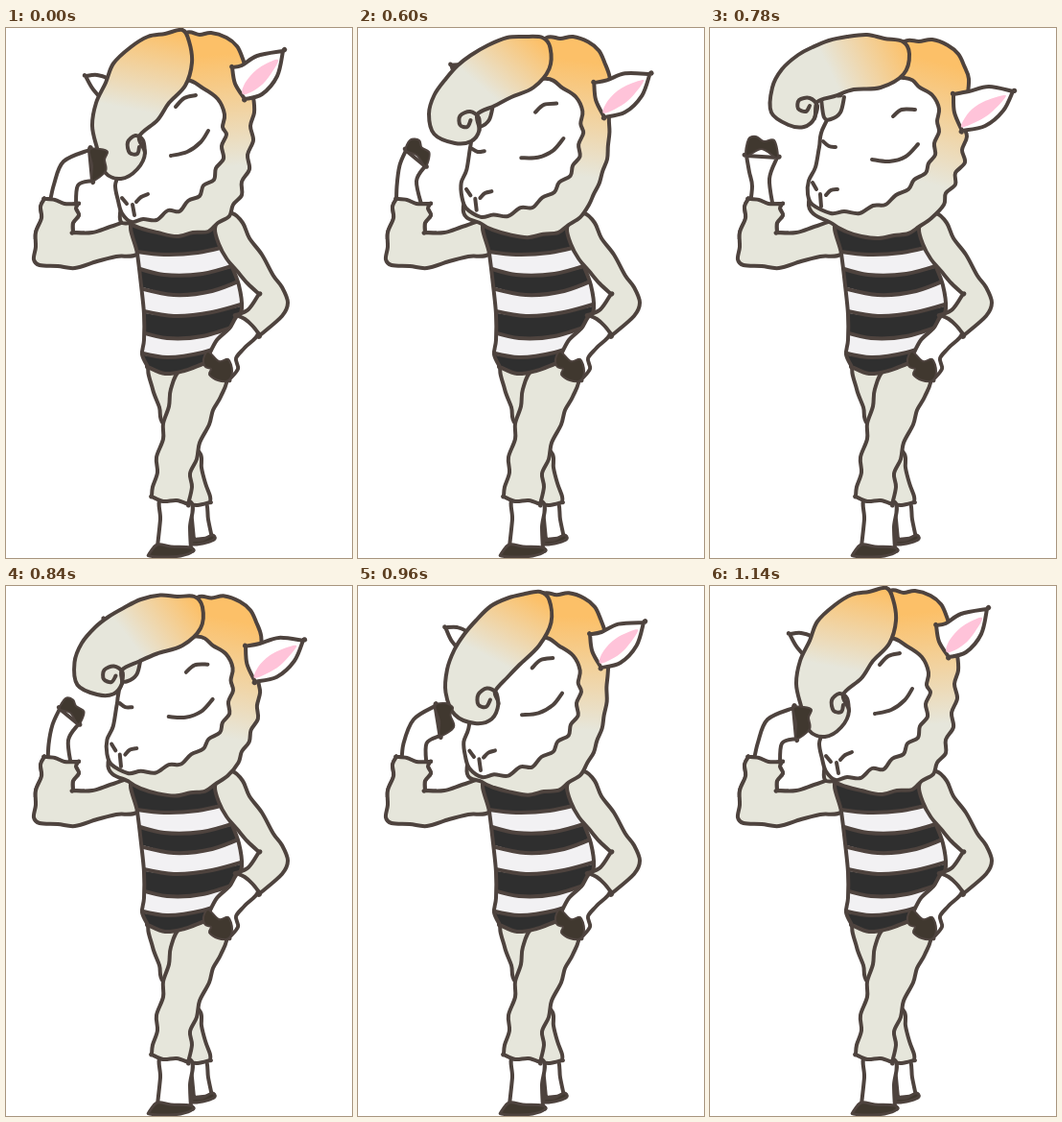
Animation of 361x552 px, one loop 1380 ms. Source, as an HTML page with a canvas:

```html
<!DOCTYPE html>
<html lang="en">
<head>
<meta charset="utf-8">
<title>Sheep hair flick</title>
<style>
html, body { margin: 0; width: 100%; height: 100%; overflow: hidden; background: #fff; }
canvas { display: block; width: 361px; height: 552px; }
</style>
</head>
<body>
<canvas id="stage"></canvas>
<script>
const LOOP = 1380, STEP = 30;
const LINE = '#4e433e', WOOL = '#e6e6db', ORANGE = '#fcc068', HOOF = '#40382f',
      DARK = '#2f2f2f', PALE = '#f2f1f3', PINK = '#ffc3d9', WHITE = '#fff';

const canvas = document.getElementById('stage');
const ctx = canvas.getContext('2d');
const ratio = window.devicePixelRatio || 1;
canvas.width = 361 * ratio;
canvas.height = 552 * ratio;

const nums = text => text.trim().split(/\s+/).map(Number);
const mix = (a, b, k) => a.map((v, i) => v + (b[i] - v) * k);

// Value of a track of [time, numbers] at time t
function sample(track, t) {
  if (t <= track[0][0]) return track[0][1];
  for (let i = 1; i < track.length; i++) {
    const [t0, a] = track[i - 1], [t1, b] = track[i];
    if (t < t1) return mix(a, b, (t - t0) / (t1 - t0));
  }
  return track[track.length - 1][1];
}

// Smooth curve through flat x y points; a repeated point makes a corner
function trace(p, closed) {
  const n = p.length / 2;
  const at = i => {
    const j = closed ? (i + n) % n : Math.max(0, Math.min(n - 1, i));
    return [p[2 * j], p[2 * j + 1]];
  };
  ctx.beginPath();
  ctx.moveTo(p[0], p[1]);
  for (let i = 0; i < (closed ? n : n - 1); i++) {
    const [a, b, c, d] = [at(i - 1), at(i), at(i + 1), at(i + 2)];
    ctx.bezierCurveTo(
      b[0] + (c[0] - a[0]) / 6, b[1] + (c[1] - a[1]) / 6,
      c[0] - (d[0] - b[0]) / 6, c[1] - (d[1] - b[1]) / 6, c[0], c[1]);
  }
  if (closed) ctx.closePath();
}

function shape(p, fill, width = 4, closed = true) {
  trace(p, closed);
  if (fill) { ctx.fillStyle = fill; ctx.fill(); }
  if (width) { ctx.lineWidth = width; ctx.stroke(); }
}
const line = (p, width = 4) => shape(p, null, width, false);

function fade([x0, y0, x1, y1]) {
  const g = ctx.createLinearGradient(x0, y0, x1, y1);
  g.addColorStop(0, ORANGE);
  g.addColorStop(1, WOOL);
  return g;
}

// Still parts
const farLeg = nums('150 352 153 376 160 395 164 412 190 430 203 444 204 458 208 474 213 488 213 494 213 494 200 497 190 496 190 496 170 440 182 357');
const farFoot = nums('192 492 194 512 196 533 196 533 215 531 215 531 211 512 208 492');
const farHoof = nums('195 534 205 533 215 528 218 532 209 536 195 538');
const nearLeg = nums('182 356 172 376 170 394 164 412 164 428 157 447 158 463 153 478 152 488 152 488 164 493 178 492 190 496 190 496 194 478 192 464 199 449 202 432 212 413 216 398 224 384 230 364 210 350');
const nearFoot = nums('162 490 161 512 158 540 158 540 193 543 193 543 192 520 193 494');
const nearHoof = nums('149 548 158 538 172 540 192 541 195 545 182 550 162 551 150 550');
const torso = nums('132 203 137 235 141 268 144 298 144 325 142 340 148 353 148 353 166 360 186 357 205 350 217 346 217 346 228 330 240 309 246 292 243 268 235 247 224 226 218 203 218 203 175 215');
const stripes = [
  '130 232 165 236 200 234 232 227',
  '130 248 165 257 205 256 245 245',
  '135 270 175 278 215 274 252 260',
  '135 293 175 300 215 296 255 285',
  '135 315 168 323 205 321 246 308',
  '135 337 168 343 205 338 240 326'
].map(nums);
const leftSleeve = nums('136 201 112 206 90 213 70 213 70 213 70 203 76 195 73 188 75 183 75 183 61 183 51 179 40 178 40 178 36 186 37 198 31 213 31 228 29 241 35 247 54 248 72 250 95 243 115 238 138 234');
const rightSleeve = nums('218 209 224 197 236 193 247 203 254 219 267 236 279 258 288 270 294 286 288 300 265 320 265 320 257 310 249 303 240 299 240 299 253 293 264 277 264 277 252 266 241 253 230 240 222 225');
const rightHand = nums('244 299 233 313 220 325 211 342 211 342 222 355 233 366 233 366 242 355 240 344 249 333 263 317');
const rightHoof = nums('211 337 206 345 208 353 214 355 212 361 221 367 232 367 236 357 232 345 222 347');

// Raised arm
const arm = {
  rest: nums('45 186 50 163 60 139 87 127 87 127 90 159 90 159 75 164 73 187'),
  lift: nums('46 186 45 165 56 139 74 123 74 123 81 153 81 153 68 164 70 187'),
  wave: nums('34 190 36 165 31 147 26 132 26 132 59 135 59 135 54 155 64 187'),
  back: nums('41 190 44 165 41 150 38 133 38 133 70 135 70 135 62 157 66 187')
};
const hoof = {
  rest: nums('87 127 98 126 106 129 103 137 104 149 90 159 90 143'),
  lift: nums('74 123 84 118 92 124 90 132 96 145 81 153 80 138'),
  wave: nums('26 132 25 115 36 110 43 117 53 115 60 135 43 127'),
  back: nums('38 133 40 116 48 113 56 118 67 117 70 135 54 126')
};
const armTrack = pose => [[480, pose.rest], [510, pose.lift], [690, pose.wave],
  [780, pose.back], [900, pose.lift], [1020, pose.rest]];
const armMove = armTrack(arm), hoofMove = armTrack(hoof);

// Hair lock and its curl
const hair = {
  rest: nums('184 2 166 6 148 9 130 20 112 37 104 57 94 78 90 102 95 125 103 150 120 157 137 147 145 130 139 113 158 96 170 78 187 60 194 36 191 14'),
  lift: nums('184 6 165 7 147 13 128 27 111 44 101 58 92 77 84 97 83 117 95 133 120 139 138 133 144 119 137 103 155 91 170 80 188 62 197 37 193 14'),
  toss: nums('201 14 182 11 164 7 143 9 124 13 107 20 92 28 75 43 65 62 64 88 82 101 98 103 109 94 112 77 130 71 150 64 178 62 202 48 208 27'),
  fall: nums('192 8 175 11 158 12 138 19 121 33 107 44 94 58 83 76 78 97 85 118 108 125 126 122 133 109 130 98 148 86 165 77 190 62 204 40 202 17'),
  over: nums('188 4 170 6 155 13 139 23 125 39 115 56 107 75 103 98 105 125 117 150 136 161 153 155 160 136 156 122 164 104 172 87 188 62 199 36 197 12')
};
const curl = {
  rest: nums('145 130 143 117 135 112 127 119 129 130 137 131 139 124'),
  lift: nums('144 119 140 106 130 101 120 108 121 118 128 119 131 111'),
  toss: nums('109 94 112 81 104 73 93 75 92 84 100 87 104 81'),
  fall: nums('133 109 131 98 121 94 112 100 112 110 120 113 125 106'),
  over: nums('160 136 157 124 148 119 139 126 139 137 147 139 151 131')
};
const hairTrack = pose => [[480, pose.rest], [510, pose.lift], [690, pose.toss],
  [780, pose.toss], [900, pose.fall], [1020, pose.over], [1140, pose.rest]];
const hairMove = hairTrack(hair), curlMove = hairTrack(curl);

// Head parts: at rest and fully turned
const turn = [[480, [0]], [690, [1]], [780, [1]], [1050, [0]]];
const pair = (rest, turned) => [nums(rest), nums(turned)];
const head = {
  backEar: pair('83 50 83 50 95 49 106 54 101 72 91 64', '108 30 108 30 120 31 130 40 122 54 112 45'),
  wool: pair(
    '172 22 188 5 202 7 214 5 230 10 241 19 247 32 253 50 258 72 259 88 255 102 258 117 252 132 254 147 246 160 246 174 237 184 233 196 221 203 211 212 195 213 178 217 158 213 142 209 130 204 119 193 140 110',
    '185 35 203 14 218 14 232 12 248 18 259 27 265 39 270 53 268 75 264 98 268 113 263 127 266 140 256 151 256 163 246 172 244 184 231 198 218 207 207 214 192 216 176 219 158 217 142 212 128 204 103 181 140 110'),
  face: pair(
    '118 150 122 120 128 98 152 68 186 54 206 63 221 74 228 90 226 103 230 111 225 123 227 136 219 146 217 158 206 164 202 175 190 180 181 191 169 190 157 200 143 199 131 202 121 193 117 180 114 164',
    '110 145 114 124 119 102 150 56 203 52 219 62 232 70 239 84 237 97 239 108 234 120 235 132 228 141 225 151 213 158 207 168 194 174 183 184 170 185 156 193 140 191 126 193 107 184 102 173 103 159'),
  strand: pair('118 95 121 112 128 114 138 106 142 92', '116 74 119 93 126 95 136 88 140 72'),
  ear: pair(
    '289 24 289 24 262 29 246 39 236 41 236 41 239 58 249 74 249 74 267 69 283 50',
    '316 66 316 66 291 61 270 66 254 69 254 69 255 88 263 107 263 107 287 102 306 86'),
  pink: pair('247 69 249 58 262 43 281 33 283 37 271 55 259 65', '262 103 270 88 285 77 307 70 306 75 291 90 275 99'),
  woolFade: pair('215 28 225 145', '255 40 222 160'),
  hairFade: pair('165 3 148 88', '205 18 130 55')
};
const marks = [
  pair('177 82 186 73 198 70', '191 92 200 85 214 85'),
  pair('172 133 189 129 203 119 211 107', '169 137 187 139 204 134 217 121'),
  pair('120 136 126 137 133 134', '118 118 124 123 131 124'),
  pair('121 177 126 183', '107 161 111 168'),
  pair('136 181 141 176 148 173', '121 174 126 169 133 168'),
  pair('132 184 134 195', '115 173 116 186')
];

function drawBody() {
  shape(farFoot, WHITE);
  shape(farHoof, HOOF, 3);
  shape(farLeg, WOOL);
  shape(nearFoot, WHITE);
  shape(nearHoof, HOOF, 3);
  shape(nearLeg, WOOL);
}

function drawTorso() {
  shape(torso, DARK, 0);
  ctx.save();
  trace(torso, true);
  ctx.clip();
  for (let i = 0; i < stripes.length; i += 2) {
    const low = stripes[i + 1], rim = [];
    for (let j = low.length - 2; j >= 0; j -= 2) rim.push(low[j], low[j + 1]);
    shape([...stripes[i], ...rim], PALE, 0);
  }
  stripes.forEach(s => line(s));
  ctx.restore();
  shape(torso, null);
  shape(rightHand, WHITE);
  shape(rightHoof, HOOF, 2);
  shape(rightSleeve, WOOL);
}

function drawHead(t) {
  const k = sample(turn, t)[0];
  const part = ([rest, turned]) => mix(rest, turned, k);
  shape(part(head.backEar), WHITE);
  shape(part(head.wool), fade(part(head.woolFade)));
  shape(part(head.face), WHITE);
  marks.forEach(m => line(part(m)));
  shape(part(head.strand), WOOL, 4, false);
  shape(part(head.ear), WHITE);
  shape(part(head.pink), PINK, 0);
  shape(sample(hairMove, t), fade(part(head.hairFade)));
  line(sample(curlMove, t));
}

function draw(t) {
  ctx.setTransform(ratio, 0, 0, ratio, 0, 0);
  ctx.fillStyle = WHITE;
  ctx.fillRect(0, 0, 361, 552);
  ctx.strokeStyle = LINE;
  ctx.lineCap = ctx.lineJoin = 'round';
  drawBody();
  shape(leftSleeve, WOOL);
  drawTorso();
  drawHead(t);
  shape(sample(armMove, t), WHITE, 4, false);
  shape(sample(hoofMove, t), HOOF, 2);
  // Cuff closes over the wrist
  ctx.save();
  ctx.beginPath();
  ctx.rect(20, 170, 62, 50);
  ctx.clip();
  shape(leftSleeve, WOOL);
  ctx.restore();
}

const start = performance.now();
function tick() {
  const t = (performance.now() - start) % LOOP;
  draw(Math.floor(t / STEP) * STEP);
  requestAnimationFrame(tick);
}
tick();
</script>
</body>
</html>
```
